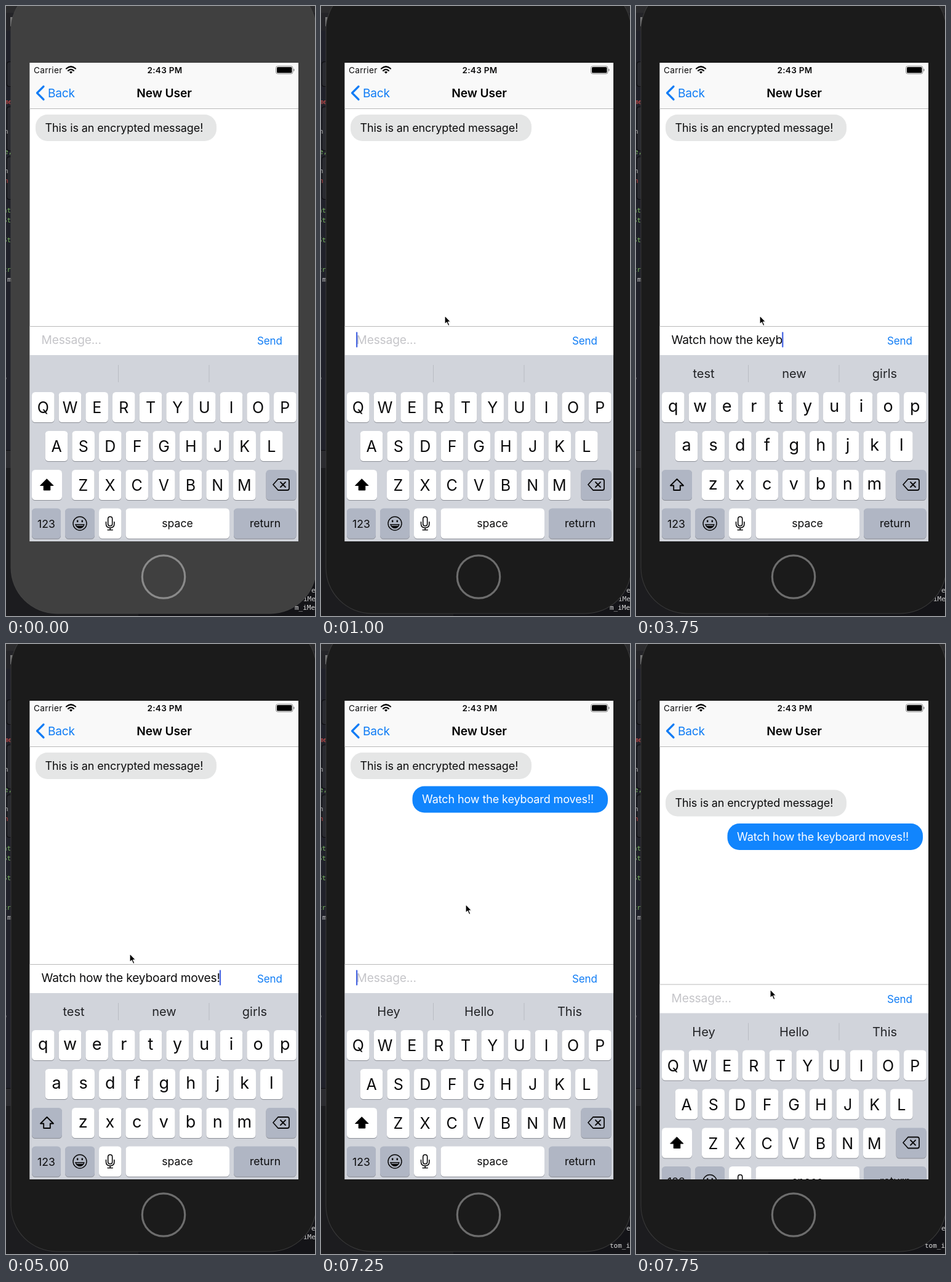
Animation of 502 by 989 pixels, one loop 8000 ms. Source, as an HTML page with a canvas:

```html
<!DOCTYPE html>
<html lang="en">
<head>
<meta charset="utf-8">
<title>Encrypted chat</title>
<style>
html, body { margin: 0; width: 100%; height: 100%; overflow: hidden; background: #1c1c1e; }
canvas { display: block; width: 502px; height: 989px; }
</style>
</head>
<body>
<canvas id="stage" width="502" height="989"></canvas>
<script>
const c = document.getElementById('stage').getContext('2d');
const LOOP = 8000, STEP = 250;
const MESSAGE = 'Watch how the keyboard moves!!';
const BLUE = '#0f7cf5', KEY = '#fff', GRAY_KEY = '#b0b6c4', INK = '#0b0b0c';

// [time, words]
const SUGGESTIONS = [
  [0, []],
  [2000, ['“Wat”', 'Watch', 'Watching']],
  [2250, ['“Watch”', 'Watched', 'Watching']],
  [2750, ['test', 'new', 'girls']],
  [6000, ['Hey', 'Hello', 'This']]
];
// [time, x, y]
const POINTER = [[250, 226, 548], [750, 201, 502], [6500, 201, 502], [7250, 235, 422], [7750, 218, 560]];
// [text, x, baseline, colour]
const CODE = [
  ['me', -3, 159, '#e0524f'], ['n', -3, 207, '#bbb'], ['e,', -3, 240, '#79b860'],
  ['n', -3, 271, '#bbb'], ['n', -3, 287, '#c84a48'], ['nt', -5, 335, '#79b860'],
  ['St', -5, 351, '#79b860'], ['St', -5, 383, '#79b860'], ['cr', -5, 431, '#79b860'],
  ['m', 2, 447, '#ccc'], [')', -4, 607, '#ddd']
];

function box(x, y, w, h, color, r = 0) {
  c.beginPath();
  c.roundRect(x, y, w, h, r);
  c.fillStyle = color;
  c.fill();
}

function text(str, x, y, size, color = INK, { align = 'left', weight = 400, track = 0, family = 'Inter, sans-serif' } = {}) {
  c.font = `${weight} ${size}px ${family}`;
  c.letterSpacing = track + 'px';
  c.textAlign = align;
  c.fillStyle = color;
  c.fillText(str, x, y);
  return c.measureText(str).width;
}

function path(d, { fill, stroke, width = 1.8, x = 0, y = 0 }) {
  const p = new Path2D(d);
  c.save();
  c.translate(x, y);
  c.lineCap = c.lineJoin = 'round';
  if (fill) { c.fillStyle = fill; c.fill(p); }
  if (stroke) { c.strokeStyle = stroke; c.lineWidth = width; c.stroke(p); }
  c.restore();
}

function mono(str, x, y, color) {
  text(str, x, y, 11, color, { family: '"DejaVu Sans Mono", monospace' });
}

function desktop(t) {
  box(0, 0, 502, 989, '#1c1c1f');
  box(0, 0, 502, 11, '#2c2c2e');
  box(0, 11, 502, 29, '#242428');
  box(7, 18, 12, 15, '#777');
  box(0, 40, 502, 680, '#20212a');
  for (const [y, h] of [[90, 41], [163, 72], [244, 70]]) {
    box(1, y, 20, h, '#0e0e10', 4);
    box(2, y + 1, 20, h - 2, '#292a30', 4);
  }
  box(0, 720, 502, 29, '#2b2b2f');
  box(0, 720, 502, 1, '#0e0e10');
  box(0, 749, 502, 240, '#1c1c1f');
  box(215, 749, 287, 240, '#141418');
  for (const [s, x, y, color] of CODE) mono(s, x, y, color);
  mono('e', 496, 951, '#ccc');
  if (t < 6250) mono('iMe', 483, 965, '#ccc');
  if (t < 1250) mono('m_iMe', 469, 979, '#ddd');
  if (t >= 6250) mono('tom_i', 469, 979, '#ddd');
}

function phone(active) {
  box(7.5, -36, 497, 1021.5, active ? '#3a3a3a' : '#444', 75);
  box(8.5, -35, 495, 1019.5, active ? '#1b1b1b' : '#404040', 74);
  c.beginPath();
  c.arc(256, 925.5, 34.7, 0, 7);
  c.lineWidth = 3.2;
  c.strokeStyle = active ? '#6d6d6d' : '#8a8a8a';
  c.stroke();
}

function bubble(str, x, y, w, color, ink) {
  box(x, y, w, 43, color, 19.5);
  text(str, x + 15.5, y + 27.5, 18, ink, { track: -0.11 });
}

function navBar() {
  box(38.5, 92, 436.5, 75, '#f9f9f9');
  box(38.5, 166, 436.5, 1, '#b8b8b8');
  text('Carrier', 45, 109, 13.7, INK, { track: 0.25 });
  text('2:43 PM', 258, 109, 13.5, INK, { align: 'center', weight: 600, track: 0.3 });
  path('M-7.5-2.5Q0-9 7.5-2.5M-4.5.8Q0-3 4.5.8', { stroke: '#000', width: 2.2, x: 105.5, y: 104 });
  path('M-2.6 3Q0 1 2.6 3L0 5.7Z', { fill: '#000', x: 105.5, y: 104 });
  c.beginPath();
  c.roundRect(438.5, 97.5, 27.5, 12.5, 3);
  c.lineWidth = 1;
  c.strokeStyle = '#8c8c8c';
  c.stroke();
  box(440, 99, 24.5, 9.5, '#000', 1.5);
  box(467, 101.8, 1.5, 4, '#8c8c8c', 1);
  path('M61 130.5L50.5 141L61 151.5', { stroke: BLUE, width: 3.2 });
  text('Back', 68, 148, 19.2, BLUE, { track: -0.25 });
  text('New User', 257, 148, 19.2, '#000', { align: 'center', weight: 600, track: -0.1 });
}

function key(x, y, w, color = KEY) {
  box(x, y + 1, w, 49, '#8b8e96', 5.5);
  box(x, y, w, 49, color, 5.5);
}

function letters(row, x, y, lower) {
  [...row].forEach((ch, i) => {
    const kx = x + i * 43.67;
    key(kx, y, 36.6);
    if (lower) text(ch.toLowerCase(), kx + 18.3, y + 32, 27, INK, { align: 'center' });
    else text(ch, kx + 18.3, y + 34, 25, INK, { align: 'center' });
  });
}

function grin(x, y) {
  path('M11 0A11 11 0 1 1-11 0A11 11 0 1 1 11 0', { stroke: INK, width: 1.5, x, y });
  path('M-3.8-4.2V-3.2M3.8-4.2V-3.2', { stroke: INK, width: 2.6, x, y });
  path('M-7.2 1.5H7.2Q5.8 7.6 0 7.6Q-5.8 7.6-7.2 1.5Z', { fill: INK, stroke: INK, width: 1, x, y });
  path('M-5.8 2.4H5.8L5.2 3.8H-5.2Z', { fill: GRAY_KEY, x, y });
}

function keyboard(t, lower) {
  box(38.5, 566, 436.5, 310, '#d1d4db');
  box(182, 582, 1, 28, '#b9bcc4');
  box(329.5, 582, 1, 28, '#b9bcc4');
  const words = SUGGESTIONS.findLast(s => t >= s[0])[1];
  words.forEach((w, i) => text(w, 110 + i * 147, 603, 20, '#222326', { align: 'center' }));

  letters('QWERTYUIOP', 42, 626, lower);
  letters('ASDFGHJKL', 63.7, 689, lower);
  letters('ZXCVBNM', 107, 752, lower);

  key(42, 752, 49, lower ? GRAY_KEY : KEY);
  path('M0-9.5L10.5 1H5.3V8.5H-5.3V1H-10.5Z', { fill: lower ? null : '#000', stroke: '#000', width: lower ? 1.8 : 1, x: 66.5, y: 776.5 });
  key(422.5, 752, 49, GRAY_KEY);
  path('M-13 0L-5-9H10Q13-9 13-6V6Q13 9 10 9H-5ZM-1-4L7 4M7-4L-1 4', { stroke: INK, x: 447, y: 776 });

  const label = { align: 'center' };
  key(42, 814.5, 47, GRAY_KEY);
  text('123', 65.5, 845.5, 17.6, INK, label);
  key(96, 814.5, 48, GRAY_KEY);
  grin(120, 839);
  key(151, 814.5, 36.5);
  path('M-3.5-7Q-3.5-10.5 0-10.5Q3.5-10.5 3.5-7V1Q3.5 4.5 0 4.5Q-3.5 4.5-3.5 1ZM-6.7-2V1Q-6.7 7.5 0 7.5Q6.7 7.5 6.7 1V-2M0 7.5V11M-4 11H4', { stroke: INK, width: 1.6, x: 169.2, y: 838.5 });
  key(194.5, 814.5, 168.5);
  text('space', 278.5, 844.5, 17.6, INK, label);
  key(370, 814.5, 101.5, GRAY_KEY);
  text('return', 421, 844.5, 17.6, INK, label);
}

function inputBar(t, typed) {
  box(38.5, 519, 436.5, 47, '#fff');
  box(38.5, 519, 436.5, 1, '#b9b9b9');
  const w = text(typed || 'Message...', 57.5, 548, 19.2, typed ? INK : '#c5c5c9', { track: -0.18 });
  if (t >= 500 && t < 7500) box(57 + (typed ? w - 0.5 : 0), 528.5, 2.3, 25, '#4a68e2', 1);
  text('Send', 408, 549, 17, BLUE, { track: -0.1 });
}

function pointer(t) {
  if (t < POINTER[0][0]) return;
  const i = POINTER.findLastIndex(p => t >= p[0]);
  const a = POINTER[i], b = POINTER[i + 1] || a;
  const k = (t - a[0]) / (b[0] - a[0] || 1);
  const at = n => a[n] + (b[n] - a[n]) * k;
  path('M0 0V14L3.2 11L5.6 16.6L8 15.6L5.6 10.2H9.8Z', { fill: '#000', stroke: '#fff', width: 1.2, x: at(1), y: at(2) });
}

function draw(now) {
  const t = Math.floor(now % LOOP / STEP) * STEP;
  const count = t < 6000 ? Math.max(0, Math.round(3 + (t - 2000) * 15 / 1750)) : 0;
  const typed = MESSAGE.slice(0, count);
  const drag = Math.max(0, (t - 7250) / 500);
  const pull = 60.5 * drag;

  desktop(t);
  phone(t >= 500);
  c.save();
  c.beginPath();
  c.rect(38.5, 92, 436.5, 776);
  c.clip();
  box(38, 92, 438, 777, '#fff');
  bubble('This is an encrypted message!', 48, 176 + pull, 294, '#e5e6e6', INK);
  if (t >= 6250) bubble(MESSAGE, 148.5, 230.5 + pull, 317.5, '#1185fd', '#fff');
  navBar();
  c.translate(0, drag > 0.5 ? 32.5 * (2 * drag - 1) : 0);
  inputBar(t, typed);
  keyboard(t, count > 0);
  c.restore();
  pointer(t);
}

const start = performance.now();
function tick() {
  draw(performance.now() - start);
  requestAnimationFrame(tick);
}
tick();
</script>
</body>
</html>
```
